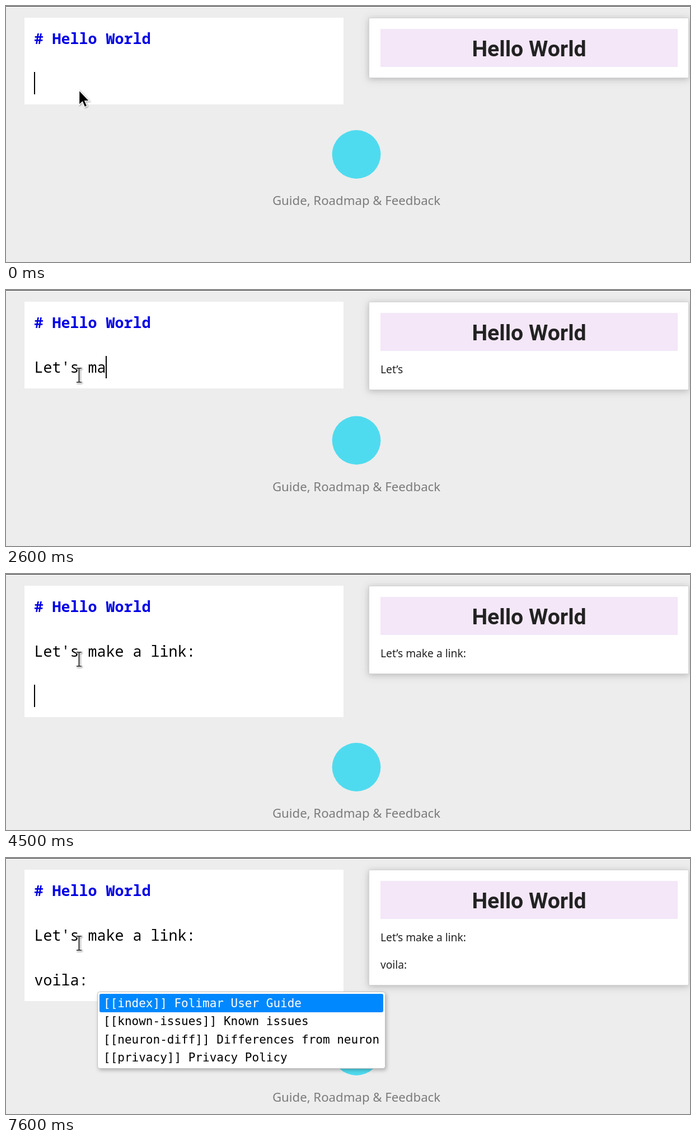
These frames come from a looping animation (1222 by 458 pixels, 8 s). An HTML page:

```html
<!DOCTYPE html>
<html lang="en">
<head>
<meta charset="utf-8">
<title>Markdown editor with live preview</title>
<style>
  html, body { margin: 0; width: 100%; height: 100%; overflow: hidden; background: #ededed; }
  svg { display: block; width: 1222px; height: 458px; }
  text { white-space: pre; }
  .code { font: 26.67px "Noto Sans Mono", monospace; }
  .mark { font-weight: 600; fill: #0000e6; }
  .h1 { font: bold 39.2px Roboto, sans-serif; fill: #222; text-anchor: middle; }
  .body { font: 19.2px "Noto Sans", sans-serif; fill: #222; }
  .links { font: 22.2px "Noto Sans", sans-serif; fill: #7b7b7b; text-anchor: middle; }
  .hint { font: 21px "DejaVu Sans Mono", monospace; }
  .card { filter: drop-shadow(0 2px 4px rgba(34, 36, 38, .12)) drop-shadow(0 2px 8px rgba(34, 36, 38, .15)); }
  .popup { filter: drop-shadow(2px 3px 3px rgba(0, 0, 0, .25)); }
  .pointer { filter: drop-shadow(1px 1px 1px rgba(0, 0, 0, .4)); }
</style>
</head>
<body>
<svg viewBox="0 0 1222 458">
  <rect width="1222" height="458" fill="#ededed"/>
  <rect width="1222" height="1" fill="#333"/>

  <rect id="editor" x="33" y="21" width="570" height="155" fill="#fff"/>
  <text class="code mark" x="50.5" y="68"># Hello World</text>
  <text class="code" id="line1" x="50.5" y="148"></text>
  <text class="code" id="line2" x="50.5" y="228"></text>
  <rect id="caret" width="2" height="40"/>

  <rect id="card" class="card" x="648.5" y="21.5" width="571" height="107" fill="#fff" stroke="#d4d4d5"/>
  <rect x="669" y="41" width="531" height="68" fill="#f4e7f8"/>
  <text class="h1" x="934.5" y="90">Hello World</text>
  <text class="body" id="para1" x="669" y="149"></text>
  <text class="body" id="para2" x="669" y="198"></text>

  <g id="footer">
    <circle cx="626" cy="265.5" r="43.4" fill="#4fdbef"/>
    <text class="links" x="626" y="356">Guide, Roadmap &amp; Feedback</text>
  </g>

  <g id="popup">
    <rect class="popup" x="163.5" y="239.5" width="514" height="137" rx="4" fill="#fff" stroke="#c0c0c0"/>
    <rect x="167" y="243" width="507" height="33" rx="3" fill="#08f"/>
    <text class="hint" x="174" y="266.5" fill="#fff">[[index]] Folimar User Guide</text>
    <text class="hint" x="174" y="299">[[known-issues]] Known issues</text>
    <text class="hint" x="174" y="331.5">[[neuron-diff]] Differences from neuron</text>
    <text class="hint" x="174" y="364">[[privacy]] Privacy Policy</text>
  </g>

  <path id="arrow" class="pointer" d="M130.5 150.5V177L136.5 171.5L140.5 181L145 179L141 170H149Z" stroke="#fff" stroke-width="1.5"/>
  <g id="beam" class="pointer" fill="none">
    <path d="M125.5 140H135.5M130.5 140V165M125.5 165H135.5" stroke="#fff" stroke-width="4"/>
    <path d="M126 140H135M130.5 140V165M126 165H135" stroke="#111" stroke-width="1.7"/>
  </g>
</svg>
<script>
  const LOOP = 8000, TICK = 100;
  const CARET_ON = 600;    // caret stays lit this long after a key
  const POPUP_AT = 7100;
  const CHAR = 16, LINE = 40;

  // Each cell between bars holds the keys pressed in one tick.
  const phrases = [
    { at: 1000, keys: "L|e|t|||'|s||| " },
    { at: 2400, keys: "m||a|k|e |a ||li|||nk|||:" },
    { at: 4400, keys: "\n|\n" },
    { at: 5300, keys: "v|o|i|la" },
    { at: 6200, keys: ": " },
    { at: 6800, keys: "" },
    { at: 7000, keys: "\0" }   // opens the completion list
  ];

  const $ = id => document.getElementById(id);
  const show = (id, on) => $(id).setAttribute("visibility", on ? "visible" : "hidden");
  const set = (id, attrs) => {
    for (const key in attrs) $(id).setAttribute(key, attrs[key]);
  };

  // The preview catches up with earlier phrases whenever a new one begins.
  function typeUntil(t) {
    let text = "", preview = "", lastKey = -200;
    for (const { at, keys } of phrases) {
      if (at > t) break;
      preview = text.trim();
      keys.split("|").forEach((cell, i) => {
        const time = at + i * TICK;
        if (!cell || time > t) return;
        text += cell.replace("\0", "");
        lastKey = time;
      });
    }
    return { text, preview, lit: t - lastKey < CARET_ON };
  }

  function draw(t) {
    const { text, preview, lit } = typeUntil(t);

    const lines = text.split("\n");
    const row = lines.length - 1;
    $("line1").textContent = lines[0];
    $("line2").textContent = lines[2] || "";
    set("editor", { height: 155 + LINE * row });
    set("caret", { x: 50 + CHAR * lines[row].length, y: 118 + LINE * row });
    show("caret", lit);

    const paras = preview.replace("'", "’").split("\n\n").filter(Boolean);
    $("para1").textContent = paras[0] || "";
    $("para2").textContent = paras[1] || "";
    set("card", { height: Math.round(107 + 49.5 * paras.length) });

    // The footer sits below the taller of the two columns.
    const shift = Math.max(LINE * row, paras.length ? 3.5 : 0);
    set("footer", { transform: `translate(0 ${shift})` });

    show("popup", t >= POPUP_AT);
    show("arrow", t < TICK);
    show("beam", t >= TICK);
  }

  const start = performance.now();
  function tick() {
    draw((performance.now() - start) % LOOP);
    requestAnimationFrame(tick);
  }
  draw(0);
  requestAnimationFrame(tick);
</script>
</body>
</html>
```
